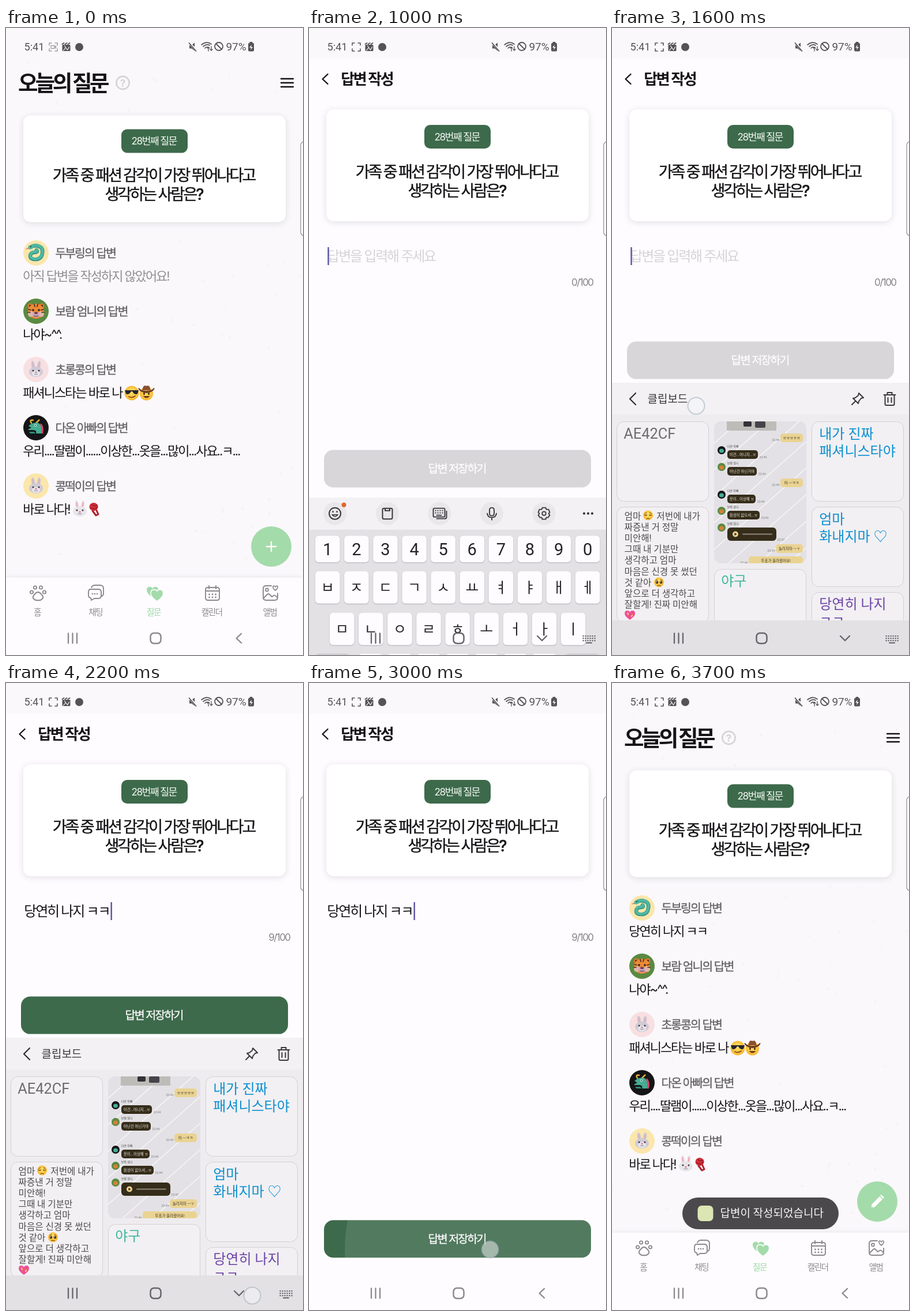
An HTML page with a canvas that plays this animation: 515 px wide and 1087 px high, repeating every 4.1 s.

```html
<!DOCTYPE html>
<html lang="ko">
<head>
<meta charset="utf-8">
<title>오늘의 질문</title>
<style>
html, body { margin: 0; width: 100%; height: 100%; overflow: hidden; background: #fefcff; }
canvas { display: block; }
</style>
</head>
<body>
<canvas id="stage" width="515" height="1087"></canvas>
<script>
const W = 515, H = 1087, LOOP = 4100, STEP = 100;
const APP = 'Inter, "Noto Sans CJK KR", "Noto Sans CJK JP", sans-serif';
const SYS = 'Roboto, "Noto Sans CJK KR", "Noto Sans CJK JP", sans-serif';
const GREEN = '#3d6a4b', MINT = '#a4dbaa', GREY = '#8b898c', INK = '#161417', PAGE = '#fefcff';
const TAU = Math.PI * 2;

const stage = document.getElementById('stage').getContext('2d');
const buffer = document.createElement('canvas');
buffer.width = W;
buffer.height = H;
const back = buffer.getContext('2d');
let g = stage;

const ease = (t, a, b) => {
  const x = Math.min(1, Math.max(0, (t - a) / (b - a)));
  return x * x * (3 - 2 * x);
};

function text(s, x, cy, size, color, o = {}) {
  const { w = 400, ls = -0.093, align = 'left', font = APP } = o;
  const gap = ls * size;
  g.font = `${w} ${size}px ${font}`;
  g.letterSpacing = gap + 'px';
  g.textAlign = align;
  g.fillStyle = g.strokeStyle = color;
  x += { left: -0.03 * size, center: gap / 2, right: gap }[align];
  const y = cy + size * 0.37;
  g.fillText(s, x, y);
  if (w === 500) { // medium weight
    g.lineWidth = size * 0.016;
    g.strokeText(s, x, y);
  }
}
const sysText = (s, x, cy, size, color, o) => text(s, x, cy, size, color, { ls: 0, font: SYS, ...o });

function box(x, y, w, h, r, fill, line) {
  g.beginPath();
  g.roundRect(x, y, w, h, r);
  if (fill) { g.fillStyle = fill; g.fill(); }
  if (line) { g.strokeStyle = line; g.lineWidth = 1; g.stroke(); }
}
function shadowBox(x, y, w, h, r, fill, blur, dy, alpha) {
  g.save();
  g.shadowColor = `rgba(40,30,50,${alpha})`;
  g.shadowBlur = blur;
  g.shadowOffsetY = dy;
  box(x, y, w, h, r, fill);
  g.restore();
}
function oval(x, y, rx, ry, fill, turn = 0) {
  g.beginPath();
  g.ellipse(x, y, rx, ry, turn, 0, TAU);
  g.fillStyle = fill;
  g.fill();
}
const dot = (x, y, r, fill) => oval(x, y, r, r, fill);

// Path drawn around (x, y); w = 0 fills it.
function path(d, x, y, color, w = 2) {
  g.save();
  g.translate(x, y);
  const p = new Path2D(d);
  g.lineWidth = w;
  g.lineCap = g.lineJoin = 'round';
  g.strokeStyle = g.fillStyle = color;
  w ? g.stroke(p) : g.fill(p);
  g.restore();
}
function ring(x, y, r, color, w) {
  g.beginPath();
  g.arc(x, y, r, 0, TAU);
  g.strokeStyle = color;
  g.lineWidth = w;
  g.stroke();
}

// ---------- system chrome ----------
function statusBar(recording) {
  const c = '#555356';
  sysText('5:41', 32, 32, 18.2, c);
  path('M-7-3V-7H-3M3-7H7V-3M7 3V7H3M-3 7H-7V3', 82, 33, recording ? '#a3a1a4' : c, 1.6);
  if (recording) path('M-4-2.5H2V2.5H-4ZM2 0L4.5-2V2Z', 82, 33, '#a3a1a4', 1.3);
  box(97.5, 29, 14, 11, 1.5, c);
  path('M-7-5L-4-7M-2-5L1-7M3-5L6-7', 104.5, 33, c, 2);
  path('M-5 5L-1 0L2 4L5-1M-3-3L0 1', 104.5, 34, '#faf8fb', 1.2);
  dot(127, 33, 7, c);
  path('M-7-3H-3L2-7V7L-3 3H-7Z', 325, 32.5, c, 0);
  path('M-6-7L7 7', 324, 33, '#faf8fb', 4);
  path('M-6-7L6 7', 323.5, 33, c, 1.7);
  path('M-9-2Q0-9 8-3M-6 1Q0-4 5-1M-3 4Q0 1 2 3', 348, 31, c, 1.7);
  path('M3 2V9M1 4L3 2L5 4M8 1V8M6 6L8 8L10 6', 348, 31, c, 1.3);
  ring(369, 32, 7, c, 1.8);
  path('M-5-5L5 5', 369, 32, c, 1.8);
  sysText('97%', 382, 32, 19, c);
  box(420, 26, 10, 14.5, 2, c);
  box(422.5, 24, 5, 3, 1, c);
  path('M1-4L-3 1H0L-1 5L3 0H0Z', 425, 33, '#fff', 0);
}
function navBar(keys, dark) {
  const c = dark ? '#67656a' : GREY;
  path('M-7.5-8.5V8.5M0-8.5V8.5M7.5-8.5V8.5', 115.5, 1058, c, 2.3);
  g.beginPath();
  g.roundRect(250.5, 1049, 18, 18, 6);
  g.strokeStyle = c;
  g.lineWidth = 2.5;
  g.stroke();
  if (!keys) return path('M4-8L-4.5 0L4 8', 404, 1058, c, 2.4);
  path('M-8-4L0 4L8-4', 404, 1058, c, 2.4);
  for (let r = 0; r < 3; r++)
    for (let i = 0; i < 6; i++) box(474.5 + i * 4, 1053 + r * 4, 2.2, 2.2, 0.5, c);
  box(480, 1065, 11, 2, 1, c);
}
function edgeHandle() {
  g.beginPath();
  g.roundRect(511, 197, 12, 163, 6);
  g.fillStyle = '#fff';
  g.fill();
  g.strokeStyle = '#8d8b8e';
  g.lineWidth = 1.2;
  g.stroke();
}
function touch(x, y) {
  dot(x, y, 14.5, 'rgba(245,246,248,.5)');
  ring(x, y, 14.5, 'rgba(150,168,178,.5)', 2);
}

// ---------- pictures ----------
function snake(x, y) {
  const d = 'M-10-10Q-3-14 4-12Q13-9 11 0Q10 10 1 11Q-10 12-10 5Q-9-1-3-1Q4-1 1-5';
  path(d, x, y, '#2f907f', 6.5);
  path(d, x, y - 0.7, '#4fb8a3', 4.5);
  oval(x - 9, y - 10, 5, 3.5, '#4fb8a3', -0.3);
  dot(x - 9, y - 11, 1, '#222');
  path('M0 0L-4 1', x - 13, y - 8, '#d65555', 1.2);
}
function tiger(x, y) {
  for (const s of [-1, 1]) {
    dot(x + s * 10, y - 9, 4.5, '#e07a2c');
    dot(x + s * 10, y - 9, 2.2, '#4a2a22');
  }
  oval(x, y, 14, 13, '#ec8a35');
  for (const s of [-1, 1]) {
    oval(x + s * 9, y + 5, 5, 5, '#e0b7a8');
    path(`M${s * 13}-3L${s * 9}-2M${s * 14} 2L${s * 10} 2M${s * 3}-12L${s * 2}-8`, x, y, '#4a2a22', 1.7);
    dot(x + s * 5, y - 2, 1.8, '#2b1b1b');
  }
  oval(x, y + 6, 6, 5, '#c8a5c4');
  oval(x, y + 3, 3, 2, '#7a3c4c');
  path('M-3 8Q0 10 3 8', x, y, '#5a2c3c', 1.2);
}
function rabbit(x, y, fur = '#cfcbd6', inner = '#dcb3bf') {
  for (const s of [-1, 1]) {
    oval(x + s * 5, y - 7, 3.2, 8, fur, s * 0.15);
    oval(x + s * 5, y - 7, 1.3, 5.5, inner, s * 0.15);
  }
  oval(x, y + 4, 12, 9, fur);
  oval(x, y + 7, 7, 5, '#e9e7ee');
  for (const s of [-1, 1]) dot(x + s * 5, y + 2, 1.5, '#3a3440');
  oval(x, y + 5, 1.8, 1.2, '#d9768a');
  path('M-3 8Q-1.5 9.5 0 8Q1.5 9.5 3 8', x, y, '#77707f', 1);
}
function dragon(x, y) {
  path('M-8-8Q-12-14-5-13M0-8Q8-16 4-12', x, y, '#e6b23c', 2.5);
  path('M8-8Q15-3 12 10H4Z', x, y, '#d8466a', 0);
  path('M-13-3Q-6-10 5-8Q10-4 9 10H0Q2 4-5 4H-14Q-12 1-8 0Z', x, y, '#43ae93', 0);
  path('M-12 7H-3L-1 10H-10Z', x, y, '#2f8b78', 0);
  dot(x - 1, y - 4, 2, '#fff');
  dot(x - 1, y - 4, 1, '#111');
}
function face(x, y, r) {
  const f = g.createRadialGradient(x, y - r * 0.3, 1, x, y, r);
  f.addColorStop(0, '#ffe36a');
  f.addColorStop(1, '#f8b62f');
  dot(x, y, r, f);
}
function coolFace(x, y) {
  face(x, y, 12.5);
  path('M-12-5H12L10 1Q5 4 1-3H-1Q-5 4-10 1Z', x, y, '#26252a', 0);
  path('M-5 6Q1 9 6 5', x, y, '#7a4a1c', 1.7);
}
function cowboy(x, y) {
  face(x, y + 1, 11.5);
  for (const s of [-1, 1]) oval(x + s * 4, y + 1, 1.5, 2.2, '#5a3514');
  path('M-6 5Q0 12 6 5Z', x, y, '#6b3a18', 0);
  path('M-13-8Q-9-3 0-3Q9-3 13-8Q11-2 0-1Q-11-2-13-8Z', x, y, '#6e3d22', 2);
  path('M-7-5Q-6-14-2-13Q0-12 2-13Q6-14 7-5Z', x, y, '#8a5130', 0);
}
function scarf(x, y) {
  path('M-3 3L3 11L7 9L3 0Z', x, y, '#b3202b', 3);
  oval(x - 1, y - 4, 7.5, 7, '#d0303a');
  path('M-6-3Q0 3 6-4M-4-8Q0-4 5-7', x, y, '#961a26', 1.5);
}
function sadFace(x, y, plead) {
  face(x, y, 8.5);
  for (const s of [-1, 1]) {
    if (plead) {
      dot(x + s * 3.5, y, 2.4, '#4a2c18');
      dot(x + s * 3.5 - 0.6, y - 0.8, 0.8, '#fff');
    } else path('M-2 0Q0 2 2 0', x + s * 4, y - 1, '#6b4218', 1.2);
    path(`M0 0L${s * 3} 1`, x + s * 2.5, y - 4.5, '#6b4218', 1);
  }
  path('M-2.5 1Q0-1 2.5 1', x, y + 5, '#6b4218', 1.2);
}
const HEART = 'M0 8Q-9 2-9-3Q-9-8-4.5-8Q-1-8 0-5Q1-8 4.5-8Q9-8 9-3Q9 2 0 8Z';

// ---------- list page ----------
function question(top, h, badge, line) {
  const o = { w: 500, ls: -0.107, align: 'center' };
  shadowBox(30, top, 455, h, 13, '#fff', 12, 2, 0.13);
  box(200, badge, 115, 41, 10, GREEN);
  text('28번째 질문', 257.5, badge + 20.5, 17.3, '#f4f8f4', { align: 'center' });
  text('가족 중 패션 감각이 가장 뛰어나다고', 257.5, line, 27, INK, o);
  text('생각하는 사람은?', 257.5, line + 33, 27, INK, o);
}
function paper() {
  g.fillStyle = '#faf8fb';
  g.fillRect(0, 0, W, H);
  let seed = 7;
  const rnd = () => (seed = seed * 16807 % 2147483647) / 2147483647;
  for (let i = 0; i < 70; i++) {
    const x = rnd() * W, y = 60 + rnd() * 880, a = rnd() * 6;
    path(`M0 0L${Math.cos(a) * 4} ${Math.sin(a) * 4}`, x, y, 'rgba(120,110,125,.05)', 1 + rnd() * 1.5);
  }
}
const people = [
  ['두부링', '#fbe6ab', snake],
  ['보람 엄니', '#5a8a42', tiger],
  ['초롱콩', '#f8dfe1', rabbit],
  ['다온 아빠', '#151416', dragon],
  ['콩떡이', '#fbe6ab', rabbit]
];
const replies = ['', '나야~^^.', '패셔니스타는 바로 나', '우리....딸램이......이상한...옷을...많이...사요..ㅋ...', '바로 나다!'];

function tabs() {
  shadowBox(0, 953, W, 140, 0, PAGE, 8, -1, 0.08);
  path('M-7 9Q-11 6-6 1Q0-7 6 1Q11 6 7 9Q4 12 0 11Q-4 12-7 9Z', 55.5, 981, GREY, 2);
  for (const [x, y] of [[-11, -2], [-5, -10], [5, -10], [11, -2]]) ring(55.5 + x, 980 + y, 2.7, GREY, 1.8);
  path('M-9-6H4Q9-6 9-1V5Q9 10 4 10H-3L-8 13L-9 9Q-13 9-13 4V-1Q-13-6-9-6M-8-9Q-6-13-2-13H7Q13-13 13-7V1Q13 5 10 6', 156, 979, GREY, 1.9);
  for (const x of [-6, -2, 2]) dot(156 + x, 981, 1.3, GREY);
  g.save();
  g.translate(254, 978);
  g.scale(1.12, 1.15);
  path(HEART, 0, 0, MINT, 0);
  path(HEART, 7, 5, PAGE, 3);
  path(HEART, 7, 5, MINT, 0);
  g.restore();
  path('M-8-10H8Q12-10 12-6V8Q12 12 8 12H-8Q-12 12-12 8V-6Q-12-10-8-10M-12-4H12M-6-13V-8M6-13V-8', 358, 980, GREY, 1.9);
  for (let i = 0; i < 6; i++) dot(352.5 + i % 3 * 5.5, 982 + (i > 2) * 5, 1.4, GREY);
  path('M2-12H-7Q-12-12-12-7V8Q-12 13-7 13H8Q13 13 13 8V1M-11 9L-5 3Q-3 1-1 3L3 7L6 5Q8 3 12 8', 458, 979, GREY, 1.9);
  ring(452.5, 974, 2.5, GREY, 1.8);
  path('M0 4Q-5 0-4-3Q-2-5 0-2Q2-5 4-3Q5 0 0 4', 467, 971, GREY, 1.7);
  ['홈', '채팅', '질문', '캘린더', '앨범'].forEach((s, i) =>
    text(s, 55 + i * 100.8, 1013, 14.5, i === 2 ? MINT : GREY, { align: 'center', w: i === 2 ? 500 : 400 }));
}
function listPage(done) {
  paper();
  text('오늘의 질문', 22, 95, 37.5, INK, { w: 700, ls: -0.122 });
  ring(202.5, 95, 11.2, '#d6d4d7', 2.7);
  text('?', 202.5, 95, 18, '#d6d4d7', { w: 700, ls: 0, align: 'center' });
  path('M-10.5-7H10.5M-10.5 0H10.5M-10.5 7H10.5', 487.5, 95, '#111', 2.4);
  question(151.5, 185, 175.5, 255);
  people.forEach(([name, color, draw], i) => {
    const y = 390 + i * 101;
    dot(52, y, 22, color);
    draw(52, y);
    text(name + '의 답변', 86, y, 20.4, '#636064', { w: 500 });
    if (i) text(replies[i], 30, y + 40, 22, INK);
  });
  if (done) text('당연히 나지 ㅋㅋ', 30, 430, 22, INK);
  else text('아직 답변을 작성하지 않았어요!', 30, 430, 22, '#918f92');
  coolFace(218, 633);
  cowboy(243.5, 633);
  rabbit(128, 834, '#e9e6ea', '#f0a6b5');
  scarf(153, 834);
  dot(460, 899, 35, MINT);
  if (done) path('M-10 10V5L4-9L9-4L-5 10ZM5-10L7-12L12-7L10-5Z', 460, 899, '#fff', 0);
  else path('M-8 0H8M0-8V8', 460, 899, '#fff', 2.4);
  tabs();
  navBar(false);
}
function toast(alpha) {
  if (!alpha) return;
  g.save();
  g.globalAlpha = alpha;
  box(122, 892, 271, 55, 27.5, '#4b494c');
  box(148.5, 906, 27, 27, 7, '#dbe6b4');
  sysText('답변이 작성되었습니다', 188, 919, 19, '#f6f4f7');
  g.restore();
}

// ---------- keyboard ----------
function toolbar(top, active) {
  g.fillStyle = '#f3f1f4';
  g.fillRect(0, top, W, 55);
  const y = top + 27, c = '#39373a';
  for (const x of [45, 136, 226.5, 317, 407.5]) dot(x, y, 20, '#e9e7ea');
  ring(45, y, 10, c, 2);
  dot(41.5, y - 3, 1.4, c);
  dot(48.5, y - 3, 1.4, c);
  path('M-5 2Q0 8 5 2Z', 45, y, c, 1.5);
  dot(60.5, top + 12, 4, '#e0662b');
  path('M-6-9H6Q8.5-9 8.5-7V7Q8.5 9.5 6 9.5H-6Q-8.5 9.5-8.5 7V-7Q-8.5-9-6-9M-4-9V-5H4V-9', 136, y, active ? '#2d9bd8' : c, 2);
  path('M-9-9H7Q9-9 9-7V4Q9 6 7 6H-9Q-11 6-11 4V-7Q-11-9-9-9M12-4V6Q12 9 9 9H-5M-5 3H3', 226.5, y, c, 1.9);
  for (let i = 0; i < 8; i++) dot(219.5 + i % 4 * 4, y - 5 + (i > 3) * 4, 1.1, c);
  path('M0-10Q4-10 4-6V0Q4 4 0 4Q-4 4-4 0V-6Q-4-10 0-10M-8 0Q-7 7 0 7Q7 7 8 0M0 7V11', 317, y, c, 1.9);
  path('M-3-10H3L4-7L8-7L10-2L8 0L10 3L7 7L4 7L3 10H-3L-4 7L-7 7L-10 3L-8 0L-10-2L-8-7L-4-7Z', 407.5, y, c, 1.8);
  ring(407.5, y, 3.2, c, 1.8);
  for (const x of [477, 484, 491]) dot(x, y, 2.1, c);
}
function key(x, y, w, h, label, size = 25, fill = PAGE) {
  shadowBox(x, y, w, h, 6, fill, 2, 1, 0.25);
  sysText(label, x + w / 2, y + h / 2, size, '#242225', { align: 'center' });
}
function keyRows(top) {
  [...'1234567890'].forEach((s, i) => key(11 + i * 50.1, top + 65.5, 42.5, 46, s, 29));
  [...'ㅂㅈㄷㄱㅅㅛㅕㅑㅐㅔ'].forEach((s, i) => key(11 + i * 50.1, top + 127, 42.5, 56, s));
  [...'ㅁㄴㅇㄹㅎㅗㅓㅏㅣ'].forEach((s, i) => key(36 + i * 50.1, top + 199, 42.5, 56, s));
  [...'ㅋㅌㅊㅍㅠㅜㅡ'].forEach((s, i) => key(86 + i * 50.1, top + 270, 42.5, 56, s));
  const alt = '#cfcdd1', y = top + 342;
  key(11, top + 270, 60, 56, '⇧', 22, alt);
  key(444, top + 270, 60, 56, '⌫', 20, alt);
  key(11, y, 60, 56, '!#1', 18, alt);
  key(79, y, 50, 56, '한/영', 15, alt);
  key(137, y, 42, 56, ',', 24);
  key(187, y, 190, 56, '한국어', 16);
  key(385, y, 42, 56, '.', 24);
  key(435, y, 69, 56, '↵', 22, alt);
}

const bubbles = [
  [732, 53, '이건...아니지...ㅠ'], [761, 51, '아닌건 아닌거야'],
  [809, 49, '옷이...이상해 ㅠ'], [837, 56, '음성이 없으셔...ㅠ']
];
const sent = [[703, 39, 'ㅠㅠㅠㅠㅠ'], [781, 39, '아 ㅡㅋㅋ'], [895, 47, '놀리지마 ㅡㅜ'], [916, 94, '투표가 올라왔어요!']];

function chatCard() {
  g.save();
  box(177, 682, 160, 246, 12, '#e3e1e5');
  g.clip();
  for (let i = 0; i < 9; i++) path('M0 0L170-150', 177, 720 + i * 46, 'rgba(255,255,255,.75)', 1.4);
  g.fillStyle = '#bdbcb9';
  g.fillRect(199, 682, 86, 16);
  box(228, 682, 14, 9, 2, '#333238');
  box(248, 682, 18, 11, 2, '#45444a');
  bubbles.forEach(([y, w, s], i) => {
    const odd = i % 2;
    dot(190, y, 7, odd ? '#5a8a42' : '#151416');
    oval(190, y + 1, 4, 3.5, odd ? '#d4803a' : '#43ae93');
    sysText(odd ? '보람 엄니' : '다온 아빠', 200, y - 7, 5, '#444');
    box(200, y, w, 15, 5, '#352d1a');
    sysText(s, 204, y + 7.5, 6.5, '#f0ece2');
    sysText('22:44', 203 + w, y + 12, 5, '#777');
  });
  dot(190, 866, 7, '#5a8a42');
  oval(190, 867, 4, 3.5, '#d4803a');
  sysText('보람 엄니', 200, 859, 5, '#444');
  box(200, 866, 85, 23, 6, '#352d1a');
  dot(214, 877.5, 5, '#ead18c');
  path('M-1.5-2.5L2.5 0L-1.5 2.5Z', 214, 877.5, '#352d1a', 0);
  path('M0 0H50', 227, 877.5, '#8f887a', 2);
  sysText('22:57', 287, 887, 5, '#777');
  sent.forEach(([y, w, s]) => {
    box(331 - w, y, w, 15, 5, '#ead392');
    sysText(s, 331 - w / 2, y + 7.5, 6.5, '#3a3222', { align: 'center' });
    sysText('22:44', 329 - w, y + 11, 5, '#777', { align: 'right' });
  });
  g.restore();
}
function clipboard(top) {
  const blue = '#0b8fd0', violet = '#6c42a6';
  g.save();
  g.translate(0, top - 615);
  g.fillStyle = '#f3f1f4';
  g.fillRect(0, 615, W, 55);
  g.fillStyle = '#eeecef';
  g.fillRect(0, 670, W, 357);
  path('M5-10L-5 0L5 10', 36, 643, '#2e2c2f', 2.2);
  sysText('클립보드', 62, 643, 19, '#39373a');
  path('M2-10L10-2L6-1L2 4L1 8L-8-1L-4-2L1-6ZM-4 4L-10 10', 426, 643, '#39373a', 2);
  path('M-10-7H10M-4-7V-11H4V-7M-8-7V9Q-8 11-6 11H6Q8 11 8 9V-7M-3-2V6M3-2V6', 481.5, 643, '#39373a', 2);
  g.beginPath();
  g.rect(0, 670, W, 357);
  g.clip();
  const cards = [[8.5, 682, 138], [8.5, 830, 200], [177.5, 938, 120], [346.5, 682, 138], [346.5, 830, 138], [346.5, 978, 138]];
  for (const [x, y, h] of cards) box(x, y + 0.5, 159, h, 12, '#f2f0f3', '#d3d1d4');
  sysText('AE42CF', 21, 703, 25.4, '#6d6b6e');
  ['엄마       저번에 내가', '짜증낸 거 정말', '미안해!', '그때 내 기분만', '생각하고 엄마', '마음은 신경 못 썼던', '것 같아', '앞으로 더 생각하고', '잘할게! 진짜 미안해']
    .forEach((s, i) => sysText(s, 22, 846 + i * 19.15, 15.6, '#4c4a4d'));
  sadFace(62.5, 845, false);
  sadFace(81.5, 961, true);
  path(HEART, 31, 1018, '#ee4f93', 0);
  path('M-4-4L-3-1M4 0L3 2', 31, 1018, '#ffd95c', 2);
  chatCard();
  sysText('야구', 190, 958, 24, '#3db79d');
  sysText('내가 진짜', 360, 703, 24, blue);
  sysText('패셔니스타야', 360, 733, 24, blue);
  sysText('엄마', 360, 851, 24, blue);
  sysText('화내지마 ♡', 360, 881, 24, blue);
  sysText('당연히 나지', 360, 998, 24, violet);
  sysText('ㅋㅋ', 360, 1028, 24, violet);
  g.restore();
}
function keyboard(t, p) {
  const top = 1027 - 412 * p, closing = t >= 2300;
  g.save();
  if (closing) g.globalAlpha = 0.35 + 0.65 * Math.min(1, p * 1.1);
  g.fillStyle = '#e3e1e4';
  g.fillRect(0, top, W, H - top);
  if (t >= 1600 && !closing) clipboard(top);
  else {
    toolbar(top, closing);
    if (!closing) keyRows(top);
  }
  g.restore();
  if (closing && t < 2600) box(327, 1027, 149, 60, 30, '#dbd9dc');
}

// ---------- write page ----------
function writePage(t) {
  g.fillStyle = PAGE;
  g.fillRect(0, 0, W, H);
  g.fillStyle = '#faf8fb';
  g.fillRect(0, 0, W, 53);
  path('M4.5-8.5L-4.5 0L4.5 8.5', 28, 88.5, '#161417', 2.4);
  text('답변 작성', 56, 88.5, 26, INK, { w: 600 });
  question(141, 194, 168, 249.5);

  const typed = t >= 2000;
  text(typed ? '당연히 나지 ㅋㅋ' : '답변을 입력해 주세요', 32, 395, 24, typed ? INK : '#d6d4d7');
  text((typed ? 9 : 0) + '/100', 494, 441, 17, '#878588', { align: 'right' });
  if (t >= 900) {
    g.fillStyle = '#5a52a3';
    g.fillRect(typed ? 181.5 : 32.3, 380, 2.4, 31);
  }

  const p = ease(t, 826, 1167) * (1 - ease(t, 2280, 2640));
  const y = 931.3 - 387.7 * p;
  g.save();
  box(26, y, 463, 65, 16, typed ? GREEN : '#d8d6d9');
  if (t >= 3000) {
    g.clip();
    dot(314, 982, 252 + (t - 3000) * 1.2, 'rgba(255,255,255,.11)');
  }
  g.restore();
  text('답변 저장하기', 257.5, y + 32.5, 19.5, PAGE, { w: 500, align: 'center' });

  if (p > 0) keyboard(t, p);
  navBar(t >= 900 && t < 2300, p > 0);
}

// start, end, x, y
const taps = [[100, 300, 461, 900], [900, 1000, 150, 400], [1500, 1700, 146, 655], [1800, 2000, 410, 1003], [2200, 2600, 427, 1062], [3000, 3100, 314, 982]];

function render(t) {
  g = stage;
  listPage(t >= 2000);
  const show = ease(t, 150, 450) * (1 - ease(t, 3100, 3400));
  if (show > 0) {
    g = back;
    writePage(t);
    g = stage;
    g.globalAlpha = show;
    g.drawImage(buffer, 0, 0);
    g.globalAlpha = 1;
  }
  toast(ease(t, 3200, 3500));
  statusBar(t < 100);
  edgeHandle();
  for (const [a, b, x, y] of taps)
    if (t >= a && t < b) touch(x, y);
}

function tick() {
  const t = performance.now() % LOOP;
  render(Math.min(3700, Math.floor(t / STEP) * STEP));
  requestAnimationFrame(tick);
}
tick();
</script>
</body>
</html>
```
